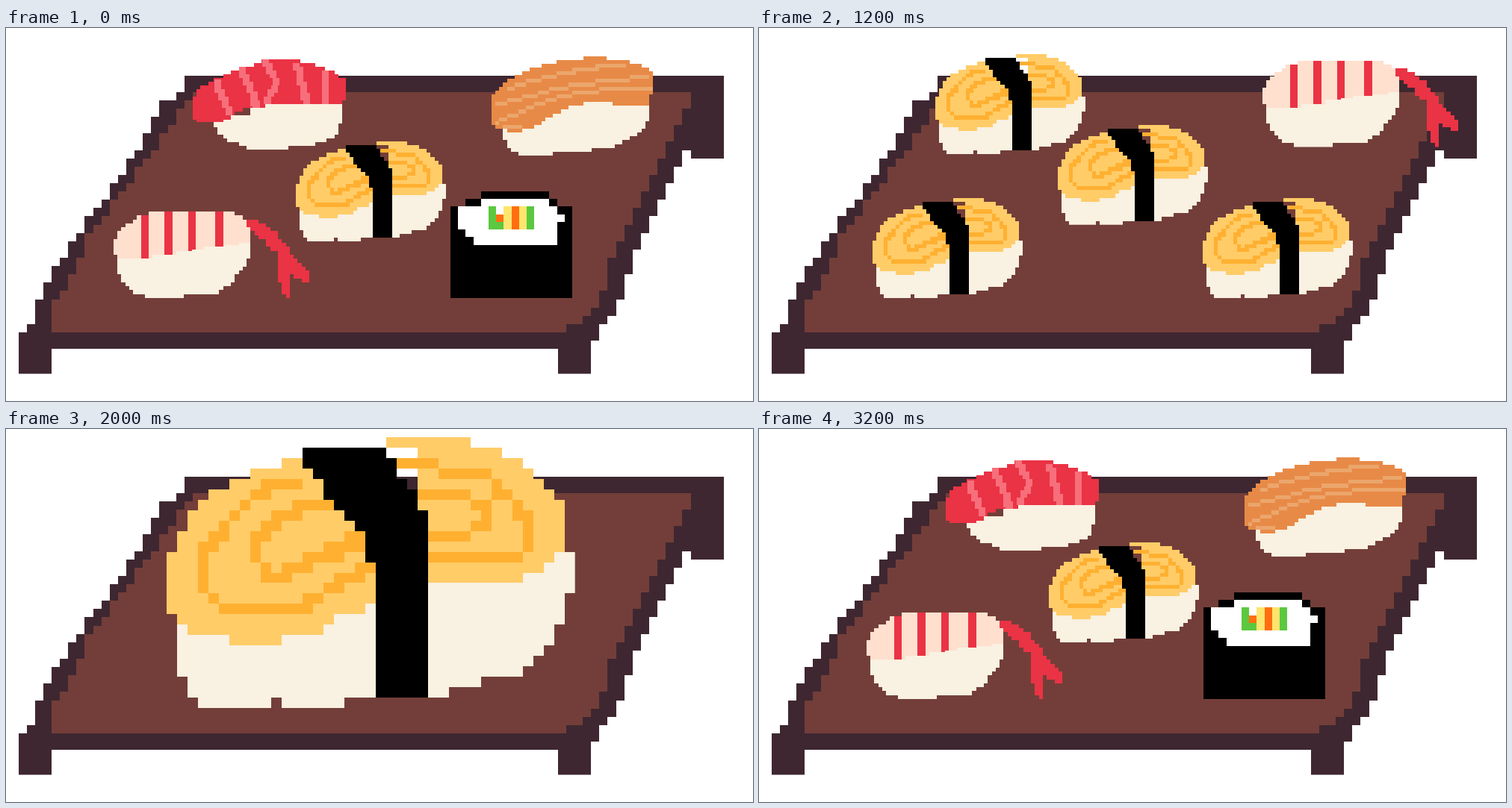
Animation of 1000 by 500 pixels, one loop 3.4 s. Source, as an HTML page:

```html
<!DOCTYPE html>
<html lang="en">
<head>
<meta charset="utf-8">
<title>Sushi board</title>
<style>
  html, body { margin: 0; width: 100%; height: 100%; overflow: hidden; background: #fff; }
  svg { display: block; shape-rendering: crispEdges; }
  body > svg { width: 100vw; height: 100vh; }

  .rice { fill: #f9f1e1; }
  .egg { fill: #ffcc68; }
  .red { fill: #ea3345; }
  .orange { fill: #ff6f0f; }
  .line { fill: none; stroke-width: 1; }

  /* One beat is 200ms, 17 beats per loop; --at is the beat a piece appears on. */
  .piece {
    visibility: hidden;
    animation: 3400ms step-end calc(var(--at) * 200ms - 3400ms) infinite;
  }
  .b1 { animation-name: b1; }
  .b2 { animation-name: b2; }
  .b3 { animation-name: b3; }
  .b4 { animation-name: b4; }
  .b5 { animation-name: b5; }
  .b6 { animation-name: b6; }
  .b7 { animation-name: b7; }
  @keyframes b1 { 0% { visibility: visible } 5.8823%, 100% { visibility: hidden } }
  @keyframes b2 { 0% { visibility: visible } 11.7647%, 100% { visibility: hidden } }
  @keyframes b3 { 0% { visibility: visible } 17.647%, 100% { visibility: hidden } }
  @keyframes b4 { 0% { visibility: visible } 23.5294%, 100% { visibility: hidden } }
  @keyframes b5 { 0% { visibility: visible } 29.4117%, 100% { visibility: hidden } }
  @keyframes b6 { 0% { visibility: visible } 35.2941%, 100% { visibility: hidden } }
  @keyframes b7 { 0% { visibility: visible } 41.1764%, 100% { visibility: hidden } }
</style>
</head>
<body>
<svg viewBox="0 0 1000 500" preserveAspectRatio="none">
  <defs>
    <symbol id="board" viewBox="0 0 85 36" preserveAspectRatio="none">
      <path fill="#3e2731" d="M20 0H85V10H81V9H80V11H79V13H78V15H77V17H76V19H75V21H74V24H73V27H72V29H71V30H70V32H69V36H65V33H4V36H0V31H1V30H2V27H3V25H4V23H5V22H6V20H7V19H8V17H9V16H10V15H11V13H12V12H13V10H14V9H15V7H16V5H17V3H19V2H20z"/>
      <path fill="#733e39" d="M21 2H81V4H80V6H79V8H78V10H77V12H76V14H75V16H74V18H73V20H72V22H71V26H70V28H69V29H68V30H66V31H4V27H5V26H6V24H7V22H8V19H9V18H10V17H11V15H12V14H13V13H14V11H15V10H16V9H17V7H18V6H19V4H20V3H21z"/>
    </symbol>

    <symbol id="tamago" viewBox="0 0 39 26" preserveAspectRatio="none">
      <path class="rice" d="M1 16H20V14H34V13H36V12H37V11H39V15H38V18H37V20H36V21H35V22H34V23H30V24H27V25H17V26H11V25H10V26H3V25H2V23H1z"/>
      <path class="egg" d="M13 2H11V3H8V4H6V5H4V6H3V7H2V9H1V11H0V17H1V18H2V19H6V20H11V19H15V18H16V17H19V16H20V2z"/>
      <path class="egg" d="M21 0H29V1H32V2H34V3H35V4H36V5H37V6H38V11H37V12H36V13H34V14H24V1H21z"/>
      <g class="line" stroke="#ffb031">
        <path d="M9 4.5h4M8 5.5h2M7 6.5h1M6 7.5h1M5 8.5h1M4 9.5h2M3 10.5h2M3 11.5h1M3 12.5h1M3 13.5h1M3 14.5h1M4 15.5h1M5 16.5h9M13 15.5h2M15 14.5h2M16 13.5h3M18 12.5h2"/>
        <path d="M12 6.5h4M10 7.5h3M9 8.5h2M8 9.5h2M8 10.5h1M8 11.5h1M9 12.5h1M9 13.5h3M11 12.5h3M13 11.5h4M15 10.5h4M17 9.5h2"/>
        <path d="M22 2.5h4M26 3.5h5M31 4.5h1M31 5.5h2M33 6.5h1M33 7.5h2M34 8.5h1M34 9.5h1M34 10.5h1M25 11.5h9"/>
        <path d="M24 5.5h5M29 6.5h2M30 7.5h1M29 8.5h2M25 9.5h4"/>
      </g>
      <path d="M13 1H21V2H22V4H23V5H24V7H25V25H20V12H19V9H18V8H17V7H16V6H15V4H14V3H13z"/>
    </symbol>

    <symbol id="tuna" viewBox="0 0 40 24" preserveAspectRatio="none">
      <path class="rice" d="M5.5 15H15V11H39V17H38V20H37V21H35V22H32V23H25V24H14V23H12V22H9V21H8V20H6.5V18H5.5z"/>
      <path class="red" d="M18 0H28V1H32V2H34.5V3H37V4H38V5H40V11H39V12H19V13H13V14H11V15H10V16H8V16.6H1V16H0V10H1V8H2V7H4V6H5.5V5H8V4H10V3H12V2H16V1H18z"/>
      <path class="line" stroke="#f76f7b" style="stroke-width:1.8" d="M6.5 5.5v3.5M7.5 8v3M8.5 10v3M9.5 12.5v2.5M13 2v3M14 4v3M15 6v3M16 8.5v4M16.6 11v2M19 0v2M20 1v3M21 3v2M21.8 5v2M21.3 7v2M20.4 8v2M19.5 10v2M27 1v2M28 2v5M29 6v5M29.7 9v3M34.7 3v9"/>
    </symbol>

    <symbol id="salmon" viewBox="0 0 42 26" preserveAspectRatio="none">
      <path class="rice" d="M3 19H9V14H18V12H41V17H40V19H39V20H38V21H36V22H34V23H32V24H26V25H16V26H7V25H5V24H4V22H3z"/>
      <path fill="#e88a47" d="M24 0H30V1H36V2H39V3H41V4H42V10H41V13H31.5V12H24V13H20V14H18V15H16V16H14V17H13V18H11V19H8V20H4V19H1V18H0V10H1V9H2V8H3V7H4V6H6V5H8V4H10V3H13V2H17V1H24z"/>
      <path class="line" stroke="#eba66c" d="M27 2.5h8M21 3.5h7M17 4.5h5M13 5.5h4M9 6.5h4M6 7.5h3M4 8.5h2M36 5.5h5M27 6.5h9M20 7.5h7M15 8.5h5M12 9.5h3M8 10.5h4M4 11.5h4M1 12.5h3M28 8.5h14M21 9.5h7M17 10.5h4M14 11.5h3M11 12.5h3M9 13.5h2M7 14.5h2M4 15.5h3M2 16.5h2M1 17.5h1M3 18.5h5"/>
    </symbol>

    <symbol id="shrimp" viewBox="0 0 50 22" preserveAspectRatio="none">
      <path class="rice" d="M1 11H16V8H35V12H34V14H33V15H32V16H31V18H30V19H28V20H27V21H18V22H8V21H5V20H4V19H3V18H2V16H1z"/>
      <path fill="#ffe0ce" d="M9 0H31V1H33V2H35V8H32V8.6H28V9H23V9.6H20V10H16V11H10V12H1V11H0V7H1V5H2V4H3V3H5V2H6V1H9z"/>
      <path class="red" d="M7 1h2v11h-2zM13 0h2v11h-2zM19 0h2v9.6h-1v.4h-1zM26 0h2v9h-2z"/>
      <path class="red" d="M34 2H37V3H39V4H40V5H42V7H43V8H44V9H45V11H46V12H47V13H48V14H49V15H50V18H48V17H46V16H45V22H44V21H43V18H42V10H40V9H39V7H37V6H36V5H35V4H34z"/>
    </symbol>

    <symbol id="roll" viewBox="0 0 16 14" preserveAspectRatio="none">
      <path d="M4 0H13V1H14V2H16V14H0V2H2V1H4z"/>
      <path fill="#fff" d="M4 1H13V2H14V3H15V4H14V7H3V6H2V5H1V2H4z"/>
      <path fill="#5cc83f" d="M5 2h1v2h1v1h-2zM10 2h1v3h-1z"/>
      <path fill="#ffe56e" d="M7 2h1v3h-1zM9 2h1v3h-1z"/>
      <path class="orange" d="M6 3h1v1h-1zM8 2h1v3h-1z"/>
    </symbol>

    <symbol id="ikura" viewBox="0 0 36 26" preserveAspectRatio="none">
      <path d="M1 9H35V25H34V26H2V25H1z"/>
      <path class="orange" d="M1 1H2V0H3V1H7V.5H8V1H12V0H17V1H20V0H24V1H28V0H35V6H36V9H35V10H34V11H31V10H29V11.5H28V11H26V11.5H25V10H19V11H16V11.5H14V11H11V11.5H9V11H6V11.5H4V11H1V6H0V3H1z"/>
      <path class="line" stroke="#e88a47" d="M21 .5h3M20 1.5h3M23 3.5h3M24 4.5h3M26 6.5h1M28 5.5h3M27 7.5h2M29 2.5h1M29 3.5h1M31 6.5h1M32 7.5h1M33 4.5h1M33 5.5h1M30 8.5h1"/>
      <path class="line" stroke="#f07a22" style="stroke-width:.5" d="M3 3.5h3v2M7 6h2v2M9 3.5h1v2M12 4v4M14 6h3v2M16 3h2v2M19 5v4M21 4h2v4"/>
    </symbol>
  </defs>

  <use href="#board" x="16.5" y="63.5" width="944.5" height="400"/>

  <!-- corners -->
  <use href="#tuna" class="piece b7" style="--at:16" x="250" y="41.5" width="205" height="121.5"/>
  <use href="#salmon" class="piece b7" style="--at:13" x="650" y="37.5" width="216" height="133.5"/>
  <use href="#shrimp" class="piece b6" style="--at:14" x="144" y="246" width="262" height="116"/>
  <use href="#roll" class="piece b3" style="--at:15" x="595" y="219" width="163" height="143"/>
  <use href="#tamago" class="piece b2" style="--at:1" x="576.5" y="236.7" width="201.5" height="134"/>
  <use href="#salmon" class="piece b2" style="--at:3" x="142" y="228.3" width="216" height="133.5"/>
  <use href="#shrimp" class="piece b4" style="--at:3" x="674" y="43.5" width="262" height="116"/>
  <use href="#tamago" class="piece b5" style="--at:3" x="593.5" y="228" width="201.5" height="134"/>
  <use href="#tamago" class="piece b3" style="--at:5" x="151.5" y="228" width="201.5" height="134"/>
  <use href="#tamago" class="piece b2" style="--at:6" x="235.5" y="35" width="201.5" height="134"/>
  <use href="#tamago" class="piece b1" style="--at:7" x="637.5" y="27.3" width="213.5" height="141.7"/>

  <!-- centre -->
  <use href="#ikura" class="piece b2" style="--at:2" x="406" y="128.3" width="186" height="135.5"/>
  <use href="#tamago" class="piece b5" style="--at:4" x="399.5" y="129.7" width="201.5" height="134"/>
  <use href="#tamago" class="piece b1" style="--at:9" x="328.5" y="100.3" width="320.5" height="212.7"/>
  <use href="#tamago" class="piece b1" style="--at:10" x="215" y="11" width="546.7" height="363"/>
  <use href="#tamago" class="piece b1" style="--at:11" x="328.5" y="100.3" width="320.5" height="212.7"/>
  <use href="#tamago" class="piece b6" style="--at:12" x="387.5" y="152" width="201.5" height="134"/>
</svg>
</body>
</html>
```
